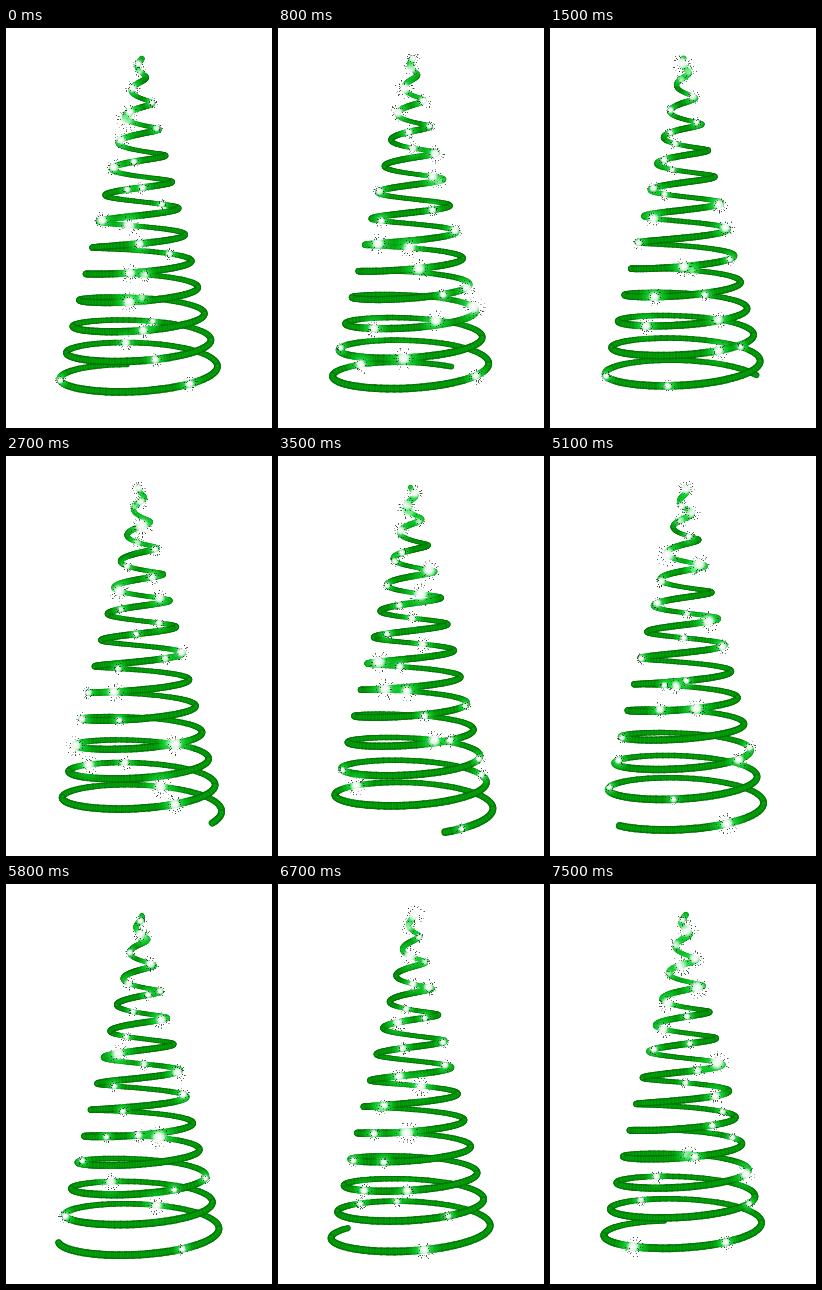
An HTML page with a canvas that plays this animation: 266x400 px, repeating every 7600 ms.

```html
<!DOCTYPE html>
<html lang="en">
<head>
<meta charset="utf-8">
<title>Spiral tree</title>
<style>
  html, body { margin: 0; width: 100%; height: 100%; overflow: hidden; background: #fff; }
  canvas { display: block; width: 266px; height: 400px; }
</style>
</head>
<body>
<canvas id="stage" width="266" height="400"></canvas>
<script>
const ctx = document.getElementById('stage').getContext('2d');
const TAU = Math.PI * 2;
const STEP = 100, STEPS = 76;
const TURNS = 12.62, PER_TURN = 72;
const CENTER = 134.3, BASE = 357, PITCH = 26.3, EYE = 175, PHASE = -0.165;
const TWINKLES = 27;

function randomFrom(seed) {
  let s = seed * 7919 + 12345;
  return () => {
    s = (s + 0x6D2B79F5) | 0;
    let t = Math.imul(s ^ (s >>> 15), 1 | s);
    t = (t + Math.imul(t ^ (t >>> 7), 61 | t)) ^ t;
    return ((t ^ (t >>> 14)) >>> 0) / 4294967296;
  };
}

// Point on the cone, u turns above the lower end.
function coil(u, spin) {
  const angle = spin - u * TAU;
  const top = Math.max(0, u - 11.5);
  const level = BASE - PITCH * u + 4.5 * top * top;
  const radius = Math.max(2, 0.247 * (level - 25.5));
  const depth = -Math.cos(angle);
  return {
    x: CENTER + radius * Math.sin(angle),
    y: level + radius * 0.0014 * (level - EYE) * depth,
    depth,
    width: (5 + 1.8 * (level - 30) / 327) * (1 + 0.16 * depth)
  };
}

function strokeCoil(points, front, color, scale, dash) {
  ctx.strokeStyle = color;
  ctx.lineCap = dash ? 'butt' : 'round';
  ctx.setLineDash(dash || []);
  for (let i = 1; i < points.length; i++) {
    const a = points[i - 1], b = points[i];
    if ((b.depth >= 0) !== front) continue;
    ctx.lineWidth = b.width * scale;
    ctx.beginPath();
    ctx.moveTo(a.x, a.y);
    ctx.lineTo(b.x, b.y);
    ctx.stroke();
  }
  ctx.setLineDash([]);
}

function glow(x, y, r, stops) {
  const g = ctx.createRadialGradient(x, y, 0, x, y, r);
  stops.forEach(([at, color]) => g.addColorStop(at, color));
  ctx.fillStyle = g;
  ctx.fillRect(x - r, y - r, 2 * r, 2 * r);
}

function twinkle(x, y, r, rand) {
  // The green light only tints the coil.
  ctx.globalCompositeOperation = 'source-atop';
  glow(x, y, r * 2.2, [[0, 'rgba(70,255,120,.95)'], [0.5, 'rgba(20,225,60,.6)'], [1, 'rgba(10,200,30,0)']]);
  glow(x, y, r * 0.85, [[0, '#fff'], [0.35, 'rgba(255,255,255,.9)'], [1, 'rgba(225,255,230,0)']]);
  ctx.globalCompositeOperation = 'source-over';
  glow(x, y, r * 0.7, [[0, '#fff'], [0.5, 'rgba(240,245,240,.7)'], [1, 'rgba(225,235,225,0)']]);
  for (let i = 0; i < r * 5; i++) {
    const a = Math.floor(rand() * 16) / 16 * TAU;
    const d = r * (0.55 + 0.65 * rand());
    ctx.fillStyle = rand() < 0.5 ? 'rgba(40,50,40,.8)' : 'rgba(140,145,140,.7)';
    ctx.fillRect(Math.round(x + d * Math.cos(a)), Math.round(y + d * Math.sin(a)), 1, 1);
  }
}

function draw(step) {
  ctx.clearRect(0, 0, 266, 400);
  const spin = step / STEPS * TAU + PHASE;
  const points = [];
  for (let i = 0; i <= TURNS * PER_TURN; i++) points.push(coil(i / PER_TURN, spin));
  for (const front of [false, true]) {
    strokeCoil(points, front, '#057d08', 1);
    strokeCoil(points, front, '#06a30d', 0.6);
    strokeCoil(points, front, 'rgba(0,80,0,.25)', 1, [1, 1.5]);
  }

  // One twinkle in each stretch of the coil, scattered afresh every step.
  const rand = randomFrom(step + 1);
  for (let i = 0; i < TWINKLES; i++) {
    const p = coil((i + rand()) / TWINKLES * TURNS, spin);
    twinkle(p.x, p.y, 4.5 + 5.5 * rand() ** 2, rand);
  }
}

let shown = -1;
const start = performance.now();
function tick(now) {
  const step = Math.floor(Math.max(0, now - start) / STEP) % STEPS;
  if (step !== shown) draw(shown = step);
  requestAnimationFrame(tick);
}
tick(start);
</script>
</body>
</html>
```
